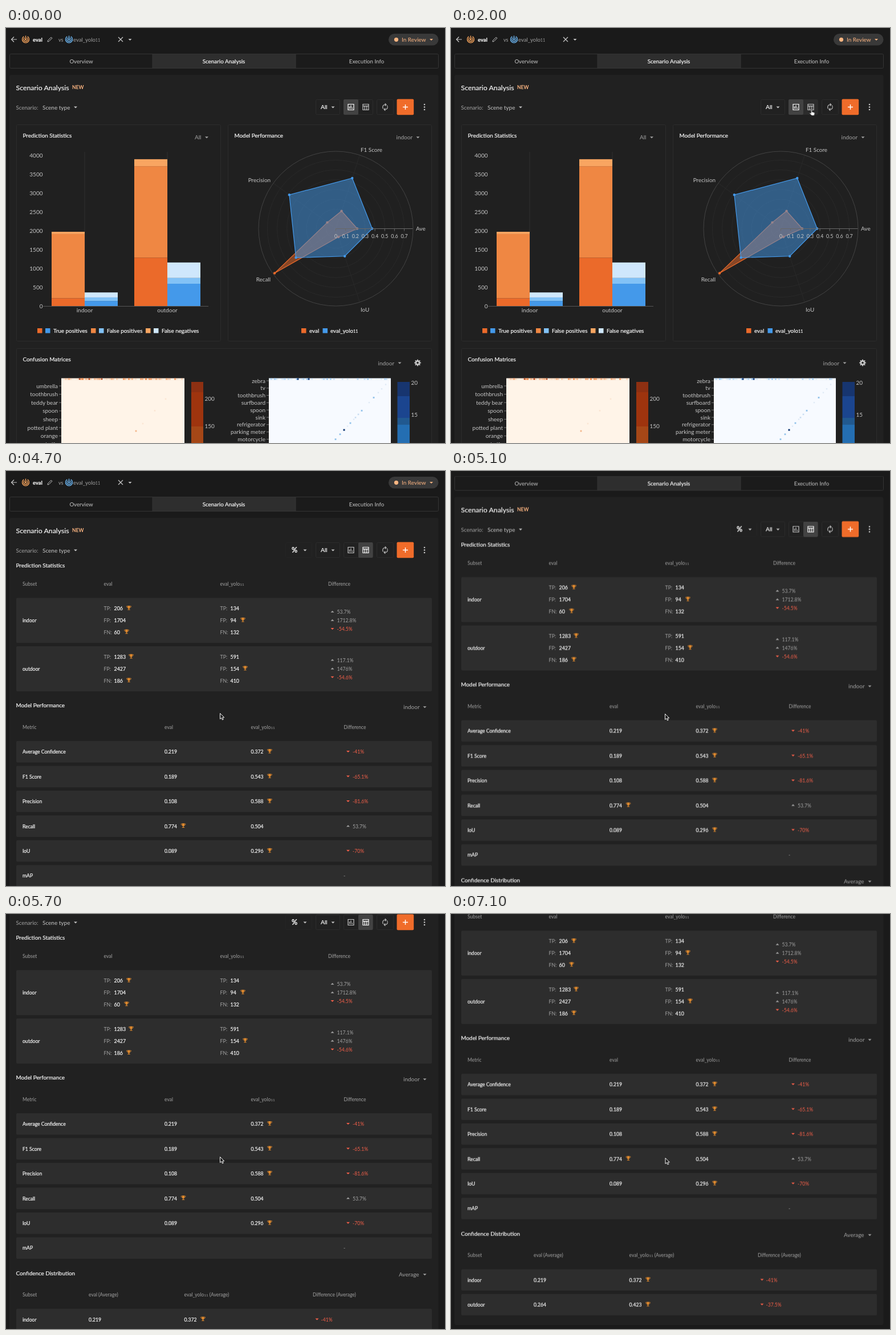
An HTML page that plays this animation: 770x727 px, repeating every 8 s.

```html
<!DOCTYPE html>
<html lang="en">
<head>
<meta charset="utf-8">
<title>Scenario Analysis</title>
<style>
html, body { margin: 0; width: 100%; height: 100%; overflow: hidden; background: #1a1a1a; }
svg { display: block; width: 770px; height: 727px; }
text { font-family: Lato, "Open Sans", sans-serif; white-space: pre; stroke-width: .22px; }
</style>
</head>
<body>
<svg id="stage" viewBox="0 0 770 727"></svg>
<script>
const WHITE = '#f4f4f4', SOFT = '#c6c6c6', GREY = '#a3a3a3', RED = '#f5604a', PEACH = '#ffb682';
const ORANGE = ['#eb6a2a', '#ef8743', '#f9a561'], BLUE = ['#4499ea', '#82c2f6', '#cfe7fc'];
const MODEL = 'eval_yolo<tspan font-size=".74em">11</tspan>';

// Drawing helpers; white text is slightly heavier than the rest
const text = (x, y, s, size = 8.6, fill = WHITE, anchor = 'start', weight = 400) =>
  `<text x="${x}" y="${y}" font-size="${size}" fill="${fill}" stroke="${fill === WHITE ? fill : 'none'}" text-anchor="${anchor}" font-weight="${weight}">${s}</text>`;
const rect = (x, y, w, h, fill, stroke = 'none', r = 0) =>
  `<rect x="${x}" y="${y}" width="${w}" height="${h}" rx="${r}" fill="${fill}" stroke="${stroke}"/>`;
const line = (x1, y1, x2, y2, stroke, w = 1) =>
  `<path d="M${x1} ${y1}L${x2} ${y2}" stroke="${stroke}" stroke-width="${w}"/>`;
const circle = (x, y, r, fill, stroke = 'none', w = 1) =>
  `<circle cx="${x}" cy="${y}" r="${r}" fill="${fill}" stroke="${stroke}" stroke-width="${w}"/>`;
const icon = (x, y, d, stroke, w = 1.2, fill = 'none') =>
  `<path transform="translate(${x} ${y})" d="${d}" fill="${fill}" stroke="${stroke}" stroke-width="${w}"/>`;
const caret = (x, y, fill = SOFT, s = 3) => icon(x, y, `M${-s} ${-s / 2}h${2 * s}l${-s} ${s}z`, 'none', 0, fill);
const caretUp = (x, y, fill) => icon(x, y, 'M-3 1.5h6l-3-3z', 'none', 0, fill);
const group = (id, s) => `<g id="${id}">${s}</g>`;
const each = (list, fn) => list.map(fn).join('');
const range = (n, fn) => each([...Array(n).keys()], fn);
const random = seed => () => (seed = (seed * 16807) % 2147483647) / 2147483647;

const target = (x, c) => icon(x, 20, 'M-3.2-5.2A6 6 0 1 0 3.2-5.2M-1.7-3A3.5 3.5 0 1 0 1.7-3M0-6.5V0', c, 1.4) + circle(x, 20, 1.6, c);
const trophy = (x, y) => icon(x, y, 'M-2.2-4h4.4v3a2.2 2.2 0 0 1-4.4 0zM-.6 1h1.2v1.6h1.6v1h-4.4v-1h1.6z', 'none', 0, '#e08a2e') +
  icon(x, y, 'M-2.2-3.2h-1.7c0 2 .8 2.4 1.8 2.6M2.2-3.2h1.7c0 2-.8 2.4-1.8 2.6', '#e08a2e', .8);
const chartIcon = c => icon(605, 138.5, 'M-5-5H5V5H-5zM-2.5 3V-1M0 3V-3M2.5 3V1', c);
const tableIcon = c => icon(631, 138.5, 'M-5-5H5V5H-5zM-5-1.8H5M-1.7-1.8V5M1.7-1.8V5', c);

function header() {
  return icon(14, 20, 'M5 0H-4.5M0-4.5L-4.5 0L0 4.5', SOFT) +
    target(34.5, '#f5a35c') + text(47, 24, 'eval', 9.4, WHITE, 'start', 700) +
    icon(77, 20, 'M-4 4l.5-2.2L2.2-3.9l1.7 1.7L-1.8 3.5z', SOFT, 1) +
    text(92, 24, 'vs', 9, GREY) + target(110.5, '#6cb6f2') + text(118, 24, MODEL, 9.5, GREY) +
    icon(201, 20, 'M-4-4L4 4M4-4L-4 4', SOFT) + caret(217.5, 20.5) +
    rect(671, 10, 87.5, 20.5, '#393939', 'none', 10.2) + circle(684.5, 20.3, 3.6, PEACH) +
    text(694, 24, 'In Review', 10, PEACH) + caret(746, 20.5, PEACH) +
    rect(6.5, 45.5, 752, 25, '#1b1b1b', '#343434', 2) + rect(257, 46, 251, 24, '#2e2e2e') +
    line(257, 46, 257, 70, '#343434') + line(508, 46, 508, 70, '#343434') +
    text(132, 61.8, 'Overview', 9.7, SOFT, 'middle') + text(382, 61.8, 'Scenario Analysis', 9.9, WHITE, 'middle') +
    text(632.5, 61.8, 'Execution Info', 9.7, SOFT, 'middle');
}

function toolbar() {
  const box = (x, w) => rect(x + .5, 125.5, w, 26, 'none', '#2c2c2c', 2);
  return text(17.5, 108.5, 'Scenario Analysis', 12.3) + text(116, 107, 'NEW', 8.5, PEACH, 'start', 700) +
    text(17.5, 142.5, 'Scenario:', 9.7, GREY) + text(64, 142.5, 'Scene type', 10, SOFT) + caret(122, 139) +
    box(543, 42) + text(552, 142.3, 'All', 10.2) + caret(573.5, 139) + box(592, 51) + box(650, 29) +
    icon(665, 138.5, 'M-3.2 3A4.4 4.4 0 0 1-1-4.2H1.5M3.2-3A4.4 4.4 0 0 1 1 4.2H-1.5M-.3-6.4l2.2 2.2L-.3-2M.3 2l-2.2 2.2L.3 6.4', SOFT, 1.1) +
    rect(685.5, 124.5, 29.7, 27.7, '#f06c2a', 'none', 2) + icon(700.5, 138.5, 'M-4.5 0h9M0-4.5v9', '#fff', 1.4) +
    each([134, 138.5, 143], y => circle(734, y, 1.3, SOFT));
}

const card = (x, y, w, h, title) => rect(x + .5, y + .5, w, h, '#202020', '#2c2c2c', 2) + text(x + 11.5, y + 23.3, title, 9.9);
const picker = (x, y, s, cx) => text(x, y, s, 10, GREY) + caret(cx, y - 3.5, GREY);

function bars() {
  const y = v => 487 - v * .066;
  const stack = (x, values, colors) => {
    let sum = 0;
    return each(values, (v, i) => rect(x, y(sum += v), 58, v * .066, colors[i]));
  };
  const key = (x, i, name) => rect(x, 526, 8.5, 8.5, ORANGE[i]) + rect(x + 14, 526, 8.5, 8.5, BLUE[i]) + text(x + 28, 534, name, 9.9);
  return card(18, 169, 358, 379, 'Prediction Statistics') + picker(331, 195.3, 'All', 352) +
    line(138, 217, 138, 487, '#2f2f2f') + line(283, 217, 283, 487, '#2f2f2f') +
    range(9, i => text(64.5, y(i * 500) + 3.8, i * 500, 10, SOFT, 'end')) +
    line(65, 487.5, 355, 487.5, '#555') +
    stack(80, [206, 1704, 60], ORANGE) + stack(138, [134, 94, 132], BLUE) +
    stack(225, [1283, 2427, 186], ORANGE) + stack(283, [591, 154, 410], BLUE) +
    text(138, 497.8, 'indoor', 10, SOFT, 'middle') + text(283, 497.8, 'outdoor', 10, SOFT, 'middle') +
    key(55, 0, 'True positives') + key(149, 1, 'False positives') + key(245, 2, 'False negatives');
}

function radar() {
  const cx = 578.5, cy = 351.5, unit = 171.5;
  const at = (v, i) => {
    const a = i * Math.PI * .4;
    return [cx + v * unit * Math.cos(a), cy - v * unit * Math.sin(a)];
  };
  const shape = (values, c) => {
    const pts = values.map(at);
    return `<path d="M${pts.join('L')}z" fill="${c}" fill-opacity=".5" stroke="${c}" stroke-width="1.2"/>` +
      each(pts, p => circle(...p, 2.2, c));
  };
  return card(389, 169, 357, 379, 'Model Performance') + picker(684.5, 195.3, 'indoor', 722.5) +
    range(7, i => circle(cx, cy, (i + 1) * 17.15, 'none', '#292929')) +
    range(5, i => line(cx, cy, ...at(.787, i), '#292929')) +
    circle(cx, cy, 135.5, 'none', '#434343') +
    shape([.219, .189, .108, .774, .089], ORANGE[0]) + shape([.372, .543, .588, .504, .296], BLUE[0]) +
    line(cx, cy, 713.5, cy, '#686868') +
    range(8, i => line(cx + i * 17.15, cy, cx + i * 17.15, cy + 4, '#686868') +
      text(cx + i * 17.15, 368, i ? '0.' + i : '0', 8.8, SOFT, 'middle')) +
    text(719, 355.3, 'Ave', 10, SOFT) + text(622, 216.5, 'F1 Score', 9.9, SOFT) + text(464, 270.3, 'Precision', 9.9, SOFT, 'end') +
    text(464, 443.5, 'Recall', 9.9, SOFT, 'end') + text(622, 496.5, 'IoU', 9.9, SOFT) +
    rect(518, 526, 8.5, 8.5, ORANGE[0]) + text(532, 534, 'eval', 9.9) +
    rect(555.5, 526, 8.5, 8.5, BLUE[0]) + text(569, 534, MODEL, 9.8);
}

function matrices() {
  const rand = random(71);
  const labels = (right, y, step, names) => each(names.split(','), (s, i) =>
    text(right, y + i * step + 3.5, s, 10, SOFT, 'end') + line(right + 2, y + i * step, right + 6, y + i * step, '#777'));
  const topRow = (x, n, w, color, power) => range(n, i =>
    `<rect x="${x + i * w}" y="613.5" width="${w}" height="3" fill="${color}" opacity="${(rand() ** power).toFixed(2)}"/>`);
  const cells = (xs, fy, c, s) => each(xs, x => rect(x - s / 2, fy(x) - s / 2, s, s, c));
  const blueY = x => 618 + (672 - x) * 1.09, warmY = x => 706 - (x - 228) * 1.08;
  return card(18, 561, 728, 240, 'Confusion Matrices') + picker(652.5, 590.5, 'indoor', 690.5) +
    circle(722, 586.5, 3.1, 'none', SOFT, 2.6) +
    range(8, i => `<path d="M722 582.6v-1.9" stroke="${SOFT}" stroke-width="2" transform="rotate(${i * 45} 722 586.5)"/>`) +
    rect(97, 613.5, 216, 120, '#fff4e8') + topRow(97, 72, 3, '#ee8a4c', 2.2) +
    cells([129, 146, 168], () => 615, '#b4441a', 2.6) +
    cells([228], warmY, '#f3b68a', 2.8) + cells([240, 261, 280], warmY, '#fbe6d4', 2.6) +
    labels(91, 627, 14.6, 'umbrella,toothbrush,teddy bear,spoon,sheep,potted plant,orange,knife') +
    rect(325, 620, 21, 18, '#8d3012') + rect(325, 638, 21, 60, '#9e340e') + rect(325, 698, 21, 30, '#a54717') +
    text(348.5, 653, '200', 10, SOFT) + text(348.5, 701, '150', 10, SOFT) +
    rect(461, 613.5, 214, 120, '#f7faff') + topRow(461, 72, 2.97, '#9cc8ee', 3.5) +
    cells([512, 531], () => 615, '#123f80', 3) +
    cells([666, 659, 653, 637, 610, 599], blueY, '#e0eaf6', 2.4) +
    cells([645, 624, 604, 586, 578], blueY, '#92c2ea', 2.8) + cells([618, 613], blueY, '#c9ddf2', 2.6) +
    cells([593], blueY, '#0d3471', 3) +
    labels(455, 618, 12.8, 'zebra,tv,toothbrush,surfboard,spoon,sink,refrigerator,parking meter,motorcycle') +
    rect(686.5, 620, 21.5, 25, '#17356f') + rect(686.5, 645, 21.5, 38, '#1b458f') +
    rect(686.5, 683, 21.5, 12, '#215990') + rect(686.5, 695, 21.5, 33, '#246eb2') +
    text(710.5, 625, '20', 10, SOFT) + text(710.5, 681, '15', 10, SOFT);
}

const charts = () => rect(592, 125, 26, 27, '#424242', 'none', 2) + chartIcon('#fff') +
  group('hover', rect(618, 126, 25, 25, '#2c2c2c')) + tableIcon(SOFT) + bars() + radar() + matrices();

function tables() {
  const heads = (y, xs, names) => each(xs, (x, i) => text(x, y + 3, names[i], 8.5, GREY));
  const delta = (x, y, s, gap = 8) => {
    const down = s[0] === '-', c = down ? RED : GREY;
    return (down ? caret : caretUp)(x, y - .5, c, 3) + text(x + gap, y + 3.2, s, 8.6, c);
  };
  const counts = (x, y, values, best) => each(['TP', 'FP', 'FN'], (k, i) => {
    const v = String(values[i]), cy = y + (i - 1) * 20.8;
    return text(x, cy + 3.2, k + ':', 8.8, GREY) + text(x + 18, cy + 3.2, v, 8.9) +
      (best.includes(i) ? trophy(x + 32 + v.length * 4, cy - 1) : '');
  });
  const subset = (y, name, a, b, bestA, bestB, diffs) => rect(18, y - 39.5, 729, 79, '#2d2d2d', 'none', 2) +
    text(29, y + 3.2, name) + counts(171.5, y, a, bestA) + counts(375.5, y, b, bestB) +
    each(diffs, (d, i) => delta(572.5, y + (i - 1) * 15.1, d));
  const row = (y, xs, name, a, b, diff, gap) => {
    const cup = a > b ? xs[0] : xs[1];
    return rect(18, y - 19, 729, 37.7, '#2d2d2d', 'none', 2) + text(29, y + 3.2, name) +
      (a ? text(xs[0], y + 3.2, a) + text(xs[1], y + 3.2, b) + trophy(cup + 33, y - 1) + delta(xs[2], y, diff, gap)
        : text(592, y + 3, '-', 8.6, GREY));
  };
  const metrics = [['Average Confidence', '0.219', '0.372', '-41%'], ['F1 Score', '0.189', '0.543', '-65.1%'],
    ['Precision', '0.108', '0.588', '-81.6%'], ['Recall', '0.774', '0.504', '53.7%'], ['IoU', '0.089', '0.296', '-70%'], ['mAP']];
  const confidence = [['indoor', '0.219', '0.372', '-41%'], ['outdoor', '0.264', '0.423', '-37.5%']];
  return rect(490.5, 125.5, 46, 26, 'none', '#252525', 2) + text(501, 142.8, '%', 12.5, WHITE, 'start', 700) + caret(524.5, 139) +
    rect(618, 125, 25.5, 27, '#424242', 'none', 2) + chartIcon(SOFT) + tableIcon('#fff') +
    text(17.5, 169, 'Prediction Statistics', 9.9) +
    heads(197.5, [29, 171.5, 375.5, 565], ['Subset', 'eval', MODEL, 'Difference']) +
    subset(261.8, 'indoor', [206, 1704, 60], [134, 94, 132], [0, 2], [1], ['53.7%', '1712.8%', '-54.5%']) +
    subset(346.6, 'outdoor', [1283, 2427, 186], [591, 154, 410], [0, 2], [1], ['117.1%', '1476%', '-54.6%']) +
    text(17.5, 414.3, 'Model Performance', 9.9) + picker(697, 417.3, 'indoor', 734.5) +
    heads(448.5, [29, 278, 429.5, 592.5], ['Metric', 'eval', MODEL, 'Difference']) +
    each(metrics, (m, i) => row(492 + i * 43.45, [278, 429.5, 600], ...m)) +
    text(17.5, 756.7, 'Confidence Distribution', 9.9) + picker(689, 759.3, 'Average', 734.5) +
    heads(790.8, [29, 145, 312.5, 538], ['Subset', 'eval (Average)', MODEL + ' (Average)', 'Difference (Average)']) +
    each(confidence, (m, i) => row(834.4 + i * 43.45, [145, 312.5, 545.5], ...m, 7));
}

const arrow = icon(0, 0, 'M.5.5V10.5L2.9 8.4L4.5 12L6.2 11.2L4.6 7.8H7.8z', '#f2f2f2', 1, '#1c1c1c');
const hand = icon(0, 0, 'M-1 .5q1-1 1.8 0V4l3.6.9q1.2.4.9 1.8L4.6 10.3H.2L-3.6 6.4q.3-1.4 2.6 0z', '#1c1c1c', .6, '#fff');

document.getElementById('stage').innerHTML =
  group('page', header() + rect(6, 82, 752.5, 831, '#212121', 'none', 3) + toolbar() + group('charts', charts()) + group('tables', tables())) +
  `<g transform="translate(632 142)">${group('ripple', circle(0, 0, 13, '#a8390f'))}</g>` +
  group('cursor', group('arrow', arrow) + group('hand', hand));

// Motion: tables of [ms, ...values], read linearly and held for one tick
const LOOP = 8000, TICK = 100;
const read = (table, t) => {
  const i = table.findIndex(k => k[0] > t);
  if (i === 0) return table[0].slice(1);
  if (i < 0) return table.at(-1).slice(1);
  const a = table[i - 1], b = table[i], f = (t - a[0]) / (b[0] - a[0]);
  return a.slice(1).map((v, n) => v + (b[n + 1] - v) * f);
};
function play(id, frame) {
  const n = LOOP / TICK;
  const steps = Array.from({ length: n + 1 }, (_, i) =>
    ({ ...frame(Math.min(i, n - 1) * TICK), offset: i / n, easing: 'step-end' }));
  document.getElementById(id).animate(steps, { duration: LOOP, iterations: Infinity });
}
const show = (id, test) => play(id, t => ({ opacity: test(t) ? 1 : 0 }));
const between = (t, a, b) => t >= a && t < b;

const scroll = [[4700, 0], [4800, 3], [4900, 10], [5000, 22], [5100, 36.5], [5300, 69], [5500, 98], [5700, 124],
  [5900, 153], [6100, 178], [6200, 188], [6300, 193.3]];
const pointer = [[500, 418, 203], [700, 466, 188], [900, 560, 160], [1000, 595, 150], [1100, 614, 147], [1200, 624, 146],
  [1300, 628, 145], [1400, 624, 146], [1600, 606, 151], [1800, 614, 148], [2000, 632.5, 143], [3000, 632.5, 143],
  [3100, 602, 133], [3200, 560, 160], [3300, 490, 220], [3400, 425, 280], [3500, 393, 310], [3900, 391, 318],
  [4300, 380, 385], [4700, 375, 424], [5000, 375, 424], [5100, 375, 425], [7000, 375, 425], [7100, 375.5, 427]];
const ripple = [[2300, .3, 1], [2500, 1, 1], [2700, 1, 1], [3000, 1.05, 0]];
const onButton = t => between(t, 1300, 1500) || between(t, 1900, 3100);

play('page', t => ({ transform: `translate(0px, ${-read(scroll, t)[0]}px)` }));
play('cursor', t => {
  const [x, y] = read(pointer, t);
  return { transform: `translate(${x}px, ${y}px)`, opacity: t < 500 ? 0 : 1 };
});
play('ripple', t => {
  const [s, o] = read(ripple, t);
  return { transform: `scale(${s})`, opacity: t < 2300 ? 0 : o };
});
show('hand', onButton);
show('arrow', t => !onButton(t));
show('hover', onButton);
show('charts', t => t < 2400);
show('tables', t => t >= 2400);
</script>
</body>
</html>
```
